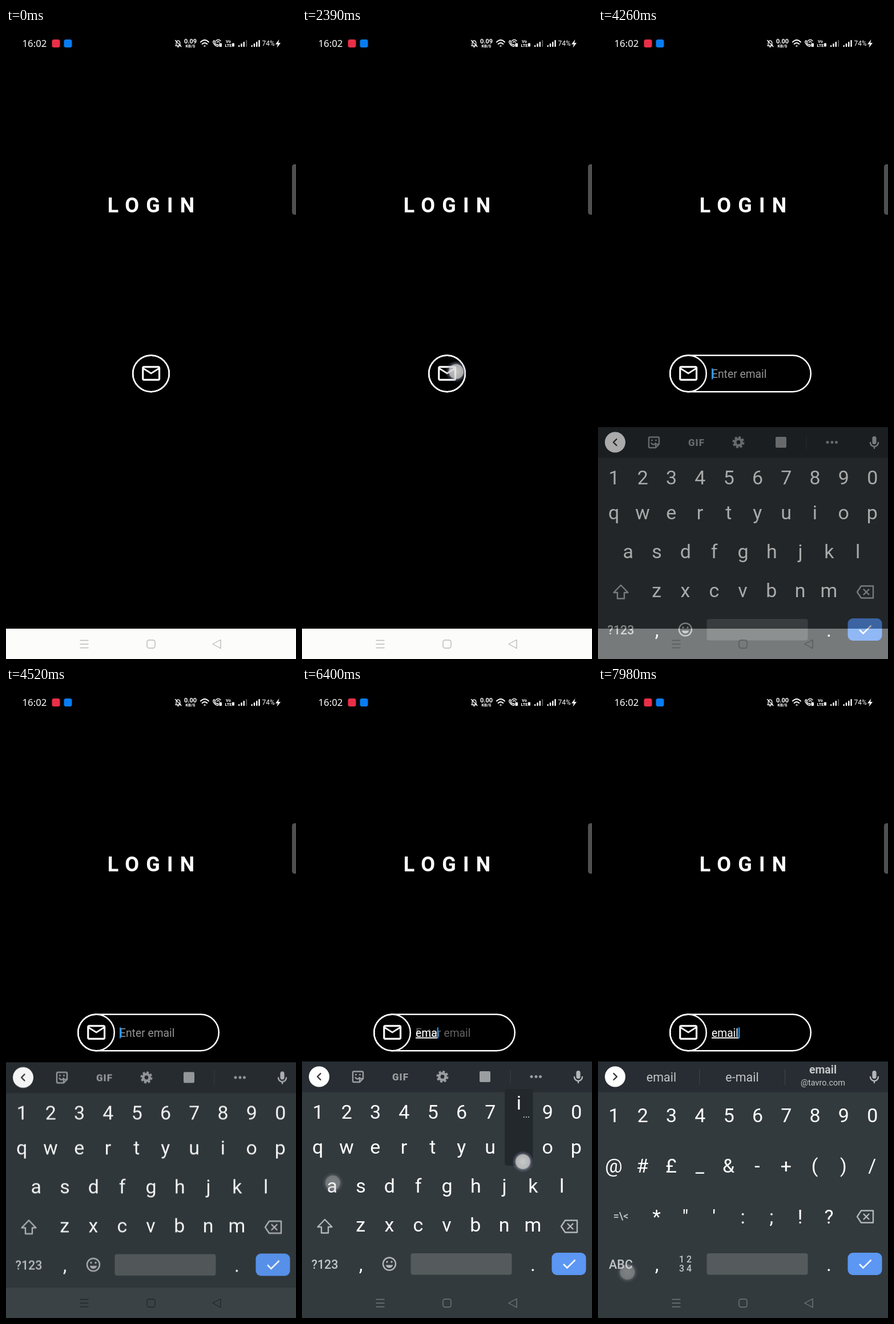
Write an HTML page that moves like this. It is 508 by 1102 pixels and loops after 8000 ms.

```html
<!DOCTYPE html>
<html lang="en">
<head>
<meta charset="utf-8">
<title>Login</title>
<style>
html, body { margin: 0; width: 100%; height: 100%; overflow: hidden; background: #000; }
body { position: relative; font-family: Roboto, sans-serif; }
svg { position: absolute; left: 0; top: 0; }
svg text { fill: #fff; }
.mid { text-anchor: middle; }
.line { fill: none; stroke: #fff; stroke-linecap: round; stroke-linejoin: round; }
.key { font-size: 34px; text-anchor: middle; }
svg .soft { fill: #c3c6c8; }
.tool { fill: #9b9ea1; }
.outline { fill: none; stroke: #b4b7b9; stroke-width: 2.4; stroke-linejoin: round; stroke-linecap: round; }

/* expanding input */
.pill { animation: expand 8s infinite; }
#label { animation: slide 8s infinite; }
.edge { fill: none; stroke: #fff; stroke-width: 2.5; }
.entry { font-size: 19.3px; }
svg #hint { fill: #949494; animation: hint 8s linear infinite; }
#typed { text-decoration: underline; }
#shown { animation: type 8s step-end infinite; }
#caret { animation: move 8s step-end infinite, caret 8s linear infinite; }

@keyframes expand {
  0%, 31.5% { x: 222.2px; width: 63.6px; animation-timing-function: ease-in-out; }
  39.125%, 100% { x: 126.2px; width: 246.6px; }
}
@keyframes slide {
  0%, 31.5% { transform: translateX(96px); animation-timing-function: ease-in-out; }
  39.125%, 100% { transform: none; }
}
@keyframes hint { 0%, 78.75% { opacity: 1; } 82.5%, 100% { opacity: 0; } }
@keyframes type {
  0% { width: 0; } 78% { width: 10.2px; } 78.75% { width: 27.1px; }
  79.75% { width: 37.6px; } 82% { width: 42.3px; } 87%, 100% { width: 47px; }
}
@keyframes move {
  0% { transform: none; } 78% { transform: translateX(10.2px); } 78.75% { transform: translateX(27.1px); }
  79.75% { transform: translateX(37.6px); } 82% { transform: translateX(42.3px); } 87%, 100% { transform: translateX(47px); }
}
@keyframes caret {
  0%, 39.1% { opacity: 0; } 39.2%, 43.6% { opacity: 1; }
  44.85%, 49.1% { opacity: 0; } 49.12%, 59% { opacity: 1; }
  59.2%, 65% { opacity: 0; } 65.2%, 71.5% { opacity: 1; }
  71.7%, 77.8% { opacity: 0; } 78%, 100% { opacity: 1; }
}

/* hard swaps */
.swap { animation: 8s step-end infinite; }
.s1 { animation-name: speedOut; } .s2 { animation-name: speedIn; }
.b1 { animation-name: barOut; } .b2 { animation-name: barIn; }
.k1 { animation-name: keysOut; } .k2 { animation-name: keysIn; }
@keyframes speedOut { 0% { opacity: 1; } 36.25%, 100% { opacity: 0; } }
@keyframes speedIn { 0% { opacity: 0; } 36.25%, 100% { opacity: 1; } }
@keyframes barOut { 0% { opacity: 1; } 83.75%, 100% { opacity: 0; } }
@keyframes barIn { 0% { opacity: 0; } 83.75%, 100% { opacity: 1; } }
@keyframes keysOut { 0% { opacity: 1; } 98.75%, 100% { opacity: 0; } }
@keyframes keysIn { 0% { opacity: 0; } 98.75%, 100% { opacity: 1; } }

/* keyboard and navigation bar */
#keyboard { animation: rise 8s linear infinite; }
#nav { fill: none; stroke-width: 1.4; stroke-linejoin: round; animation: nav 8s linear infinite; }
@keyframes rise {
  0%, 52.74% { opacity: 0; transform: translateY(80px); }
  52.75% { opacity: .4; transform: translateY(70px); }
  53.25%, 54.5% { opacity: .67; transform: translateY(43px); animation-timing-function: ease-out; }
  56.5% { opacity: .96; transform: translateY(1.4px); }
  57.5%, 100% { opacity: 1; transform: none; }
}
@keyframes nav {
  0%, 52.75% { stroke: #babab8; }
  53.25%, 54.5% { stroke: #565a5a; }
  56.5%, 63.25% { stroke: #23272b; }
  65.5%, 100% { stroke: #73787b; }
}

/* touches; --t is the moment of contact */
.touch, .pop { opacity: 0; animation: touch 8s linear var(--t) infinite; }
.pop { animation-name: pop; }
.hold { animation: hold 8s linear infinite; }
@keyframes touch { 0%, 1.5% { opacity: 1; } 4%, 100% { opacity: 0; } }
@keyframes pop { 0%, 1.5% { opacity: 1; } 1.6%, 100% { opacity: 0; } }
@keyframes hold {
  0%, 92.4% { opacity: 0; } 92.75%, 98.25% { opacity: 1; }
  99.75%, 100% { opacity: .5; }
}
</style>
</head>
<body>
<svg width="508" height="1102" viewBox="0 0 508 1102">
  <defs>
    <radialGradient id="glow">
      <stop offset="0" stop-color="#e4e4e4" stop-opacity=".86"/>
      <stop offset=".64" stop-color="#d2d2d2" stop-opacity=".82"/>
      <stop offset=".74" stop-color="#9a9ab8" stop-opacity=".4"/>
      <stop offset="1" stop-color="#8080a8" stop-opacity="0"/>
    </radialGradient>
    <clipPath id="inside"><rect class="pill" y="571.700" height="63.600" rx="31.800"/></clipPath>
    <clipPath id="written"><rect id="shown" x="199" y="585" height="36"/></clipPath>
    <g id="mic">
      <rect x="-3.600" y="-11" width="7.200" height="14" rx="3.600" fill="#b4b7b9"/>
      <path class="outline" d="M-7 0a7 7 0 0 0 14 0M0 7V10"/>
    </g>
    <g id="erase" class="outline">
      <path d="M-14 0L-7-10.500H14V10.500H-7ZM-2.500-4.500L6.500 4.500M6.500-4.500L-2.500 4.500"/>
    </g>
  </defs>

  <!-- status bar -->
  <text x="28.500" y="33" font-size="16.800" style="font-family:'Noto Sans',sans-serif">16:02</text>
  <rect x="80.500" y="20" width="14" height="14" rx="3.500" fill="#e92f48"/>
  <rect x="101.500" y="20" width="14" height="14" rx="3.500" fill="#087cf2"/>
  <path class="line" stroke-width="1.300" d="M297 31H306L304.800 29V25.500Q304.500 22.500 301.500 22.200Q298.500 22.500 298.200 25.500V29L297 31M300.500 33H302.500M296.500 21.500L307 32.500"/>
  <g class="mid" font-weight="700">
    <text class="swap s1" x="323" y="27" font-size="11">0.09</text>
    <text class="swap s2" x="323" y="27" font-size="11">0.00</text>
    <text x="323" y="34" font-size="7.500">KB/S</text>
    <text x="389.500" y="26" font-size="7.500">Vo</text>
    <text x="389.500" y="33" font-size="7.500">LTE</text>
  </g>
  <rect x="396" y="26.500" width="4" height="6" rx="1" fill="#fff"/>
  <path class="line" stroke-width="1.900" d="M341 24.500Q348 17.500 355 24.500M343.700 28Q348 23.800 352.300 28M347.300 31.500H348.700"/>
  <path class="line" stroke-width="1.400" d="M364.500 22Q361 23.500 364.500 28Q368 32.500 371.500 32L372 29.500L369.500 28.500L368.300 29Q366 27.500 365.600 25.500L366.600 24.500ZM367.500 22.500Q372 18.500 376 22.500M369.500 25Q372 22.500 374 25"/>
  <rect x="373.500" y="26.500" width="4.500" height="6.500" rx="1" fill="#fff"/>
  <g id="bars" fill="#fff"></g>
  <text x="448.500" y="31" font-size="12">74%</text>
  <path fill="#fff" d="M478.500 20L472 28.500H476L474.500 34.500L481 26H477Z"/>

  <text x="177.700" y="321.500" font-size="36" font-weight="700" letter-spacing="12.200">LOGIN</text>
  <path fill="#505050" d="M508 238H506Q501 238 501 243V321Q501 326 506 326H508Z"/>
  <rect y="1049" width="508" height="53" fill="#fcfcfa"/>

  <!-- input -->
  <rect class="pill edge" y="571.700" height="63.600" rx="31.800"/>
  <g clip-path="url(#inside)">
    <g id="label">
      <text id="hint" class="entry" x="199" y="610.800">Enter email</text>
      <g clip-path="url(#written)"><text id="typed" class="entry" x="199" y="610.800">email</text></g>
      <rect id="caret" x="199" y="594.500" width="2.300" height="19" fill="#2196f3"/>
    </g>
  </g>
  <g style="animation:slide 8s infinite">
    <circle class="edge" cx="158" cy="603.500" r="31.800"/>
    <path transform="translate(139 583.900) scale(1.6)" fill="#fff" d="M22 6c0-1.100-.9-2-2-2H4c-1.100 0-2 .9-2 2v12c0 1.100.9 2 2 2h16c1.100 0 2-.9 2-2V6zm-2 0l-8 5-8-5h16zm0 12H4V8l8 5 8-5v10z"/>
  </g>

  <g id="keyboard">
    <rect y="654" width="508" height="448" fill="#333a3d"/>
    <rect y="654" width="508" height="53.500" fill="#272d32"/>
    <circle cx="30" cy="680.500" r="18" fill="#fff"/>
    <use href="#mic" x="484" y="681"/>

    <g class="swap b1">
      <path class="line" style="stroke:#333" stroke-width="2.300" d="M32.500 675L27 680.500L32.500 686"/>
      <path class="outline" style="stroke:#9b9ea1" d="M91 671.500H105Q107 671.500 107 673.500V684L101 690H91Q89 690 89 688V673.500Q89 671.500 91 671.500M101 690V684H107M93.500 682Q97 687 101 682M94 677H95M101 677H102"/>
      <text class="mid" style="fill:#9b9ea1" x="172.500" y="686.500" font-size="17" font-weight="900" letter-spacing="1">GIF</text>
      <g fill="none" stroke="#9b9ea1">
        <circle cx="246" cy="680.500" r="5.700" stroke-width="4.600"/>
        <circle cx="246" cy="680.500" r="9" stroke-width="3" stroke-dasharray="4 3.070"/>
      </g>
      <rect class="tool" x="311" y="671" width="19" height="19" rx="2"/>
      <path stroke="#3b4146" d="M365 668V693"/>
      <g class="tool"><circle cx="402" cy="680.500" r="2.500"/><circle cx="410" cy="680.500" r="2.500"/><circle cx="417.500" cy="680.500" r="2.500"/></g>
    </g>

    <g class="swap b2 mid">
      <path class="line" style="stroke:#333" stroke-width="2.300" d="M27.500 675L33 680.500L27.500 686"/>
      <path stroke="#3f4549" d="M178 667V695M327.500 667V695"/>
      <text class="soft" x="111" y="689" font-size="21.500">email</text>
      <text class="soft" x="252.500" y="689" font-size="21.500">e-mail</text>
      <text class="soft" x="394" y="674.500" font-size="19.500" font-weight="700">email</text>
      <text class="soft" x="394" y="696" font-size="14.500">@tavro.com</text>
    </g>

    <g class="swap k1">
      <g id="letters"></g>
      <path class="outline" d="M40 930L27.500 943H34V953.500H46V943H52.500Z"/>
      <use href="#erase" x="468" y="942"/>
      <text class="mid soft" x="40" y="1015.500" font-size="21.500" font-weight="500">?123</text>
      <circle class="outline" cx="153" cy="1007.500" r="11"/>
      <path fill="#b4b7b9" d="M146.500 1009.500H159.500Q157.500 1014.500 153 1014.500Q148.500 1014.500 146.500 1009.500"/>
      <circle cx="149" cy="1004" r="1.700" fill="#b4b7b9"/><circle cx="157" cy="1004" r="1.700" fill="#b4b7b9"/>
    </g>
    <g class="swap k2">
      <g id="symbols"></g>
      <use href="#erase" x="468" y="925"/>
      <g class="mid" font-weight="500">
        <text class="soft" x="40" y="930" font-size="18">=\&lt;</text>
        <text class="soft" x="40" y="1015.500" font-size="21.500">ABC</text>
        <text class="soft" x="153" y="1005" font-size="16">1 2</text>
        <text class="soft" x="153" y="1021" font-size="16">3 4</text>
      </g>
    </g>

    <text class="key" x="103" y="1019.500">,</text>
    <text class="key" x="404.500" y="1019.500">.</text>
    <rect x="190.500" y="989" width="177" height="37.500" rx="4" fill="#555b5d"/>
    <rect x="437.500" y="988" width="60" height="39" rx="9" fill="#5b97f3"/>
    <path class="line" style="stroke-linecap:butt;stroke-linejoin:miter" stroke-width="2.600" d="M458 1008L464.500 1014.500L478.500 1000.500"/>
    <g id="pops"></g>
  </g>

  <g id="nav"><path d="M129.500 1069.500H144.500M129.500 1076H144.500M129.500 1082.500H144.500M362 1076L376 1068.500V1083.500Z"/><rect x="247" y="1069" width="14" height="14" rx="3.500"/></g>
  <g id="dots"></g>
</svg>

<script>
const $ = id => document.getElementById(id);
const step = 50.3;
const esc = c => c === '&' ? '&amp;' : c;
const key = (c, x, y) => `<text class="key" x="${x}" y="${y}">${esc(c)}</text>`;
const row = ([chars, x, y]) => [...chars].map((c, i) => key(c, x + i * step, y)).join('');

$('letters').innerHTML = [
  ['1234567890', 28, 754], ['qwertyuiop', 27.7, 815], ['asdfghjkl', 52.8, 883], ['zxcvbnm', 102.7, 951]
].map(row).join('');
$('symbols').innerHTML = [
  ['1234567890', 28, 759.5], ['@#£_&-+()/', 27.5, 848], ['*"\':;!?', 102.7, 937]
].map(row).join('');

// signal strength: the first antenna has one dim bar
$('bars').innerHTML = [407, 429.5].map((x, n) => [0, 1, 2, 3].map(i =>
  `<rect x="${x + i * 4.3}" y="${30 - i * 3}" width="2.4" height="${3 + i * 3}" rx="1" opacity="${!n && i > 2 ? .3 : 1}"/>`
).join('')).join('');

// pressed keys: character, key centre, baseline, contact point, time in seconds
const presses = [
  ['e', 128.6, 815, 132, 822, 5.7],
  ['m', 404.8, 951, 405, 945, 5.98],
  ['a', 53, 883, 54, 866, 6.18],
  ['i', 380, 815, 387, 829, 6.36],
  ['l', 455.4, 883, 458, 884, 6.84]
];
$('pops').innerHTML = presses.map(([c, x, y, , , t]) =>
  `<g class="pop" style="--t:${t}s"><rect x="${x - 25}" y="${y - 113}" width="49.5" height="134" rx="6" fill="#22282c"/>` +
  key(c, x, y - 77) + `<text class="mid" x="${x + 13}" y="${y - 63}" font-size="16">...</text></g>`
).join('');

const dot = (x, y, kind, t = 0) => `<circle class="${kind}" style="--t:${t}s" cx="${x}" cy="${y}" r="19" fill="url(#glow)"/>`;
$('dots').innerHTML = dot(270, 600, 'touch', 2.38) + dot(51.5, 1022, 'hold') +
  presses.map(([, , , x, y, t]) => dot(x, y, 'touch', t)).join('');
</script>
</body>
</html>
```
